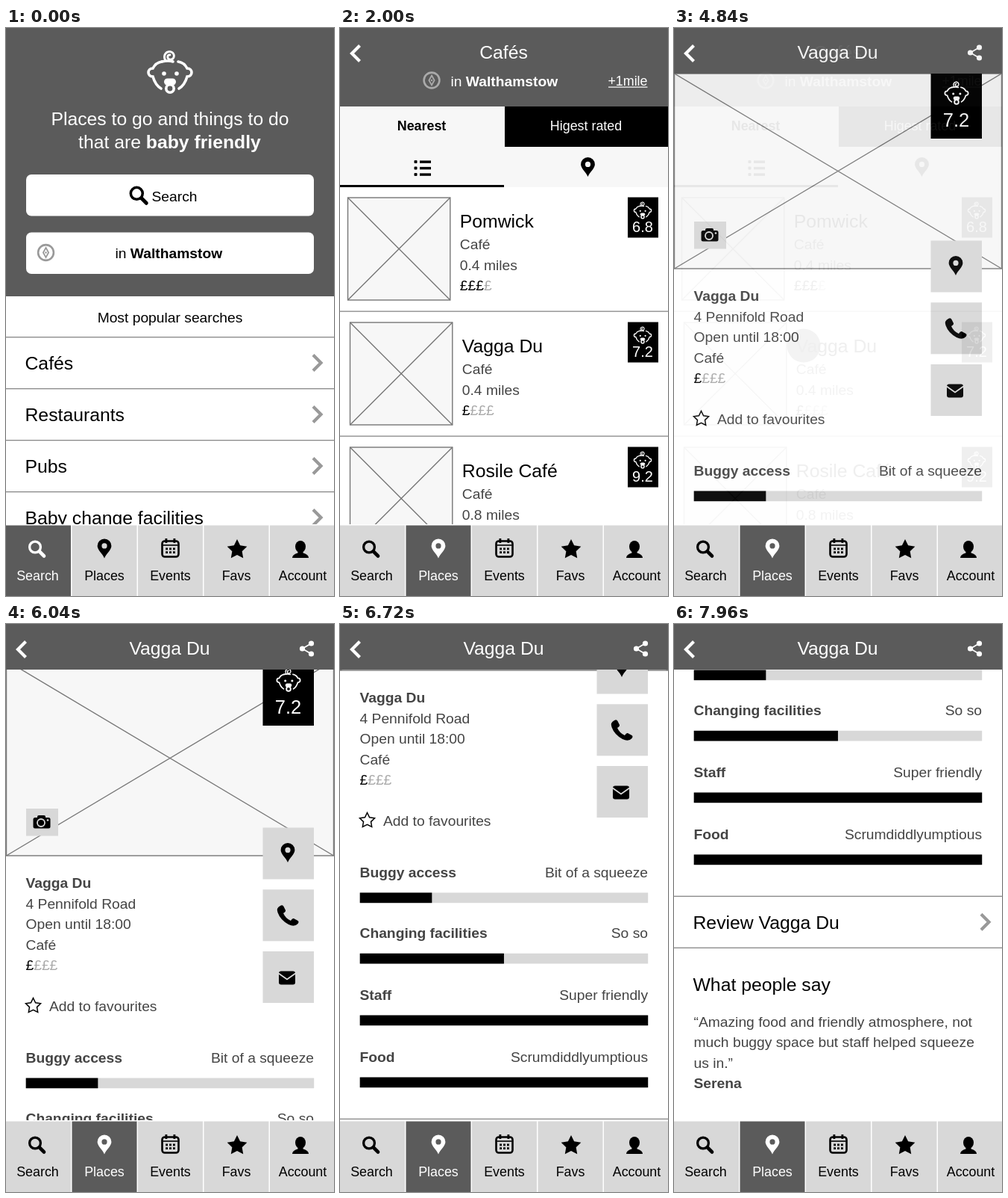
Animation, 440 px wide and 760 px high, one loop 8000 ms. Source, as an HTML page with a canvas:

```html
<!DOCTYPE html>
<html lang="en">
<head>
<meta charset="utf-8">
<title>Baby friendly places</title>
<style>
html, body { margin: 0; width: 100%; height: 100%; overflow: hidden; background: #fff; }
canvas { display: block; }
</style>
</head>
<body>
<canvas id="stage" width="440" height="760"></canvas>
<script>
const W = 440, H = 760, LOOP = 8000, STEP = 40;
const GREY = '#5b5b5b', LIGHT = '#d8d8d8', PALE = '#f7f7f7', INK = '#444', FAINT = '#aaa';
const BIG = 24.75, MID = 19.25, SMALL = 17.875;
const VENUE = 'Vagga Du';

const stage = document.getElementById('stage').getContext('2d');
const buffer = document.createElement('canvas');
buffer.width = W;
buffer.height = H;
const layer = buffer.getContext('2d');
let c = stage;

// ---- basic helpers ----
function rect(x, y, w, h, color) {
  c.fillStyle = color;
  c.fillRect(x, y, w, h);
}

function round(x, y, w, h, r, color) {
  c.beginPath();
  c.roundRect(x, y, w, h, r);
  c.fillStyle = color;
  c.fill();
}

function dot(x, y, r, color) {
  c.beginPath();
  c.arc(x, y, r, 0, Math.PI * 2);
  c.fillStyle = color;
  c.fill();
}

function ring(x, y, r, color, width) {
  c.beginPath();
  c.arc(x, y, r, 0, Math.PI * 2);
  c.strokeStyle = color;
  c.lineWidth = width;
  c.stroke();
}

function line(points, color, width, cap = 'butt') {
  c.beginPath();
  points.forEach(([x, y]) => c.lineTo(x, y));
  c.strokeStyle = color;
  c.lineWidth = width;
  c.lineCap = cap;
  c.lineJoin = 'miter';
  c.stroke();
}

function text(str, x, y, size, color = '#000', align = 'left', bold = false) {
  c.font = `${bold ? 'bold ' : ''}${size}px "Liberation Sans", Arial, sans-serif`;
  c.textAlign = align;
  c.fillStyle = color;
  c.fillText(str, x, y);
  return c.measureText(str).width;
}

// regular text followed by bold text
function mixed(a, b, x, y, size, color) {
  const w = text(a, x, y, size, color);
  text(b, x + w, y, size, color, 'left', true);
}

function at(x, y, scale, draw) {
  c.save();
  c.translate(x, y);
  c.scale(scale, scale);
  draw();
  c.restore();
}

function clip(y0, y1, draw) {
  c.save();
  c.beginPath();
  c.rect(0, y0, W, y1 - y0);
  c.clip();
  draw();
  c.restore();
}

// ---- icons ----
function baby(x, y, scale, width = 3.6) {
  at(x, y, scale, () => {
    c.strokeStyle = '#fff';
    c.lineWidth = width;
    c.lineCap = 'round';
    for (const side of [-1, 1]) {
      c.save();
      c.scale(side, 1);
      c.beginPath();
      c.moveTo(11, -14);
      c.bezierCurveTo(17, -13, 21, -9, 23, -5);
      c.bezierCurveTo(31, -5, 31, 6, 23, 6);
      c.bezierCurveTo(21, 13, 17, 19, 12, 22);
      c.stroke();
      c.restore();
    }
    c.beginPath();
    c.moveTo(-11, -14);
    c.quadraticCurveTo(-2, -16, 4, -14);
    c.stroke();
    c.beginPath();
    for (let i = 0; i <= 40; i++) {
      const a = 2.4 + i / 40 * 8.6, r = 8 - i / 40 * 6;
      c.lineTo(Math.cos(a) * r, -21 + Math.sin(a) * r);
    }
    c.lineWidth = width * 0.8;
    c.stroke();
    dot(-8, 2, 2.8, '#fff');
    dot(9, 2, 2.8, '#fff');
    round(-8, 8.5, 16, 9, 4.5, '#fff');
    ring(0, 22, 5.2, '#fff', 3.6);
  });
}

function glass(x, y, scale, color) {
  at(x, y, scale, () => {
    ring(-2.5, -2.5, 7.4, color, 3.3);
    line([[3.5, 3.5], [9.5, 9.5]], color, 4.6, 'round');
  });
}

function pin(x, top, color) {
  at(x, top, 1, () => {
    c.beginPath();
    c.moveTo(0, 26);
    c.bezierCurveTo(-2, 20, -9.4, 15, -9.4, 9.4);
    c.arc(0, 9.4, 9.4, Math.PI, 0);
    c.bezierCurveTo(9.4, 15, 2, 20, 0, 26);
    c.moveTo(3.6, 9.4);
    c.arc(0, 9.4, 3.6, 0, Math.PI * 2);
    c.fillStyle = color;
    c.fill('evenodd');
  });
}

function calendar(x, y) {
  at(x, y, 1, () => {
    c.beginPath();
    c.roundRect(-11, -10.5, 22, 21, 3.5);
    c.strokeStyle = '#000';
    c.lineWidth = 2.6;
    c.stroke();
    rect(-10, -5.8, 20, 1.6, '#000');
    for (const px of [-7, 4]) rect(px, -14, 2.8, 6, '#000');
    for (const py of [-1.5, 3.2])
      for (const px of [-6.3, -1.4, 3.5]) rect(px, py, 2.8, 2.8, '#000');
  });
}

function starPath(x, y, r) {
  c.beginPath();
  for (let i = 0; i < 10; i++) {
    const a = -Math.PI / 2 + i * Math.PI / 5, q = i % 2 ? r * 0.5 : r;
    c.lineTo(x + Math.cos(a) * q, y + Math.sin(a) * q);
  }
  c.closePath();
}

function person(x, y) {
  at(x, y, 1, () => {
    c.fillStyle = '#000';
    c.beginPath();
    c.ellipse(0, -4, 7, 8, 0, 0, Math.PI * 2);
    c.fill();
    rect(-3.5, 2, 7, 5, '#000');
    c.beginPath();
    c.moveTo(-11, 11);
    c.quadraticCurveTo(-11, 6.5, -4, 4.5);
    c.lineTo(4, 4.5);
    c.quadraticCurveTo(11, 6.5, 11, 11);
    c.fill();
  });
}

function compass(x, y, color) {
  at(x, y, 1, () => {
    ring(0, 0, 10.4, color, 2.6);
    c.beginPath();
    [[0, -6.5], [3.6, 0], [0, 6.5], [-3.6, 0]].forEach(p => c.lineTo(...p));
    c.closePath();
    c.lineWidth = 1.8;
    c.stroke();
    dot(0, 0, 1.2, color);
  });
}

function phone(x, y) {
  at(x, y, 1, () => {
    c.beginPath();
    c.moveTo(-10, -13);
    c.quadraticCurveTo(-7, -15, -5.5, -12);
    c.lineTo(-3, -7);
    c.quadraticCurveTo(-2.5, -5, -6, -3);
    c.quadraticCurveTo(-3, 4, 4, 7);
    c.quadraticCurveTo(6, 3.5, 8, 4);
    c.lineTo(13.5, 7);
    c.quadraticCurveTo(15.5, 8.5, 13.5, 11);
    c.quadraticCurveTo(9, 16, 1, 12);
    c.quadraticCurveTo(-10, 6, -13.5, -4);
    c.quadraticCurveTo(-16, -10, -10, -13);
    c.fillStyle = '#000';
    c.fill();
  });
}

function mail(x, y) {
  round(x - 11, y - 9, 22, 18, 3, '#000');
  line([[x - 12, y - 6.5], [x, y + 2], [x + 12, y - 6.5]], LIGHT, 1.8);
}

function camera(x, y) {
  round(x - 11.5, y - 6, 23, 14.5, 2.5, '#000');
  round(x - 6, y - 9, 11, 6, 2, '#000');
  ring(x - 1, y + 1, 5, LIGHT, 1.8);
  dot(x + 8, y - 2.5, 1.3, LIGHT);
}

function share(x, y) {
  line([[x + 6, y - 7], [x - 6, y], [x + 6, y + 7]], '#fff', 1.7);
  dot(x - 6, y, 3.6, '#fff');
  dot(x + 6, y - 7, 3.6, '#fff');
  dot(x + 6, y + 7, 3.6, '#fff');
}

const back = () => line([[26.5, 23.5], [16, 34], [26.5, 44.5]], '#fff', 4.2);
const more = y => line([[412, y - 10.5], [422.5, y], [412, y + 10.5]], '#999', 4.2);
const rule = y => rect(0, y, W, 1.3, '#888');

// ---- shared parts ----
function placeholder(x, y, w, h) {
  rect(x, y, w, h, PALE);
  line([[x, y], [x + w, y + h]], '#777', 1.4);
  line([[x + w, y], [x, y + h]], '#777', 1.4);
  c.strokeRect(x, y, w, h);
}

function price(x, y, level) {
  const w = text('£'.repeat(level), x, y, MID);
  text('£'.repeat(4 - level), x + w, y, MID, FAINT);
}

function tabs(active) {
  const tint = i => i === active ? '#fff' : '#000';
  rect(0, 664, W, 96, '#fff');
  ['Search', 'Places', 'Events', 'Favs', 'Account'].forEach((name, i) => {
    rect(i * 88.5, 665.5, 87, 95, i === active ? GREY : LIGHT);
    text(name, [42.5, 132, 220.5, 309, 398][i], 738.5, SMALL, tint(i), 'center');
  });
  glass(41.5, 697, 1, tint(0));
  pin(132, 683.5, tint(1));
  calendar(220.5, 697);
  starPath(310, 698, 14);
  c.fillStyle = '#000';
  c.fill();
  person(395, 698);
}

// ---- screens ----
function home() {
  rect(0, 0, W, H, '#fff');
  rect(0, 0, W, 359, GREY);
  baby(220, 59, 1);
  text('Places to go and things to do', 220, 130, BIG, '#fff', 'center');
  mixed('that are ', 'baby friendly', 97, 160.5, BIG, '#fff');
  round(27, 196, 386, 55.5, 7, '#fff');
  round(27, 273.5, 386, 55.5, 7, '#fff');
  glass(178, 224, 1.08, '#000');
  text('Search', 195.5, 232, MID);
  compass(53.5, 300.5, '#999');
  mixed('in ', 'Walthamstow', 146.5, 307.5, MID, '#000');
  text('Most popular searches', 220, 393.5, MID, '#000', 'center');
  ['Cafés', 'Restaurants', 'Pubs', 'Baby change facilities'].forEach((name, i) => {
    const y = 413 + i * 69;
    rule(y);
    text(name, 25.5, y + 44, BIG);
    more(y + 35);
  });
  tabs(0);
}

function list() {
  rect(0, 0, W, H, '#fff');
  rect(0, 0, W, 105, GREY);
  back();
  text('Cafés', 219.5, 41, BIG, '#fff', 'center');
  compass(123, 70, FAINT);
  mixed('in ', 'Walthamstow', 148.5, 77.5, MID, '#fff');
  text('+1mile', 412.5, 76.5, SMALL, '#fff', 'right');
  rect(360, 78.5, 52.5, 1.2, '#fff');

  rect(0, 105, W, 108, PALE);
  rect(221, 105, 219, 54, '#000');
  text('Nearest', 109.5, 137, SMALL, '#000', 'center', true);
  text('Higest rated', 330, 137, SMALL, '#fff', 'center');
  for (const y of [179, 187.5, 196]) {
    round(99.5, y - 2, 4, 4, 1, '#000');
    rect(107, y - 1.6, 15, 3.4, '#000');
  }
  pin(332.5, 173, '#000');
  rect(0, 210, 220, 3, '#000');

  const places = [
    ['Pomwick', '0.4 miles', 3, '6.8'],
    [VENUE, '0.4 miles', 1, '7.2'],
    ['Rosile Café', '0.8 miles', 2, '9.2']
  ];
  places.forEach(([name, miles, level, score], i) => {
    const y = 227 + i * 167, x = i ? 13.5 : 10.5;
    placeholder(x, y, 137.3, 137);
    text(name, x + 150.3, y + 40, BIG);
    text('Café', x + 150.3, y + 69, MID, INK);
    text(miles, x + 150.3, y + 96.5, MID, INK);
    price(x + 150.3, y + 124, level);
    rect(386, y - 0.5, 41, 54, '#000');
    baby(406, y + 17, 0.4, 3.2);
    text(score, 406, y + 45.5, 20, '#fff', 'center');
    rule(y + 151.5);
  });
  tabs(1);
}

function rating(y, name, verdict, part) {
  text(name, 26.5, y, MID, INK, 'left', true);
  text(verdict, 413, y, MID, INK, 'right');
  rect(26.7, y + 20.5, 386.5, 13.7, LIGHT);
  rect(26.7, y + 20.5, 386.5 * part, 13.7, '#000');
}

function detailBody() {
  placeholder(0.5, 49, 439, 261);
  rect(344.5, 47, 68.5, 89, '#000');
  baby(379, 75, 0.54, 3.2);
  text('7.2', 378.5, 120, 25.5, '#fff', 'center');
  rect(27, 247, 43, 36.5, LIGHT);
  camera(48, 265);
  for (const y of [272.5, 355.3, 438]) rect(344.5, y, 68.5, 69, LIGHT);
  pin(378, 293, '#000');
  phone(378, 390);
  mail(377, 473.5);

  text(VENUE, 26.5, 352.5, MID, INK, 'left', true);
  text('4 Pennifold Road', 26.5, 380.5, MID, INK);
  text('Open until 18:00', 26.5, 408, MID, INK);
  text('Café', 26.5, 435.5, MID, INK);
  price(26.5, 463, 1);
  starPath(36.5, 511, 10.5);
  c.strokeStyle = '#000';
  c.lineWidth = 1.5;
  c.stroke();
  text('Add to favourites', 58, 518, MID, INK);

  rating(587, 'Buggy access', 'Bit of a squeeze', 0.25);
  rating(668.3, 'Changing facilities', 'So so', 0.5);
  rating(751, 'Staff', 'Super friendly', 1);
  rating(834, 'Food', 'Scrumdiddlyumptious', 1);

  rule(909.7);
  text('Review ' + VENUE, 25.5, 953.5, BIG);
  more(944.7);
  rule(978.7);
  text('What people say', 25.5, 1036.5, BIG);
  ['“Amazing food and friendly atmosphere, not',
   'much buggy space but staff helped squeeze',
   'us in.”'].forEach((s, i) => text(s, 26.5, 1084.5 + i * 27.5, MID, INK));
  text('Serena', 26.5, 1167, MID, INK, 'left', true);
}

function detail(offset) {
  rect(0, 0, W, H, '#fff');
  clip(61, 664, () => at(0, -offset, 1, detailBody));
  rect(0, 0, W, 61, GREY);
  back();
  text(VENUE, 219.5, 41, BIG, '#fff', 'center');
  share(403.5, 33);
  tabs(1);
}

// ---- timeline ----
function scrollAt(t) {
  if (t < 6040) return -12;
  const u = (t - 6040) / 1000;
  return Math.round(350.5 * u + 51.2 * u * u - 44.6 * u * u * u);
}

// tap on one screen, then dissolve to the next
function dissolve(from, to, tapX, tapY, p) {
  from();
  dot(tapX, tapY, 22.5, 'rgba(0,0,0,.75)');
  c = layer;
  to();
  c = stage;
  c.globalAlpha = (1 - Math.cos(Math.PI * p)) / 2;
  c.drawImage(buffer, 0, 0);
  c.globalAlpha = 1;
}

function render(t) {
  const page = () => detail(scrollAt(t));
  if (t < 1000) home();
  else if (t < 2000) dissolve(home, list, 174, 448, (t - 1000) / 1000);
  else if (t < 4000) list();
  else if (t < 5000) dissolve(list, page, 174, 425, (t - 4000) / 1000);
  else page();
}

const start = performance.now();
function tick() {
  const t = (performance.now() - start) % LOOP;
  render(Math.floor(t / STEP) * STEP);
  requestAnimationFrame(tick);
}
tick();
</script>
</body>
</html>
```
